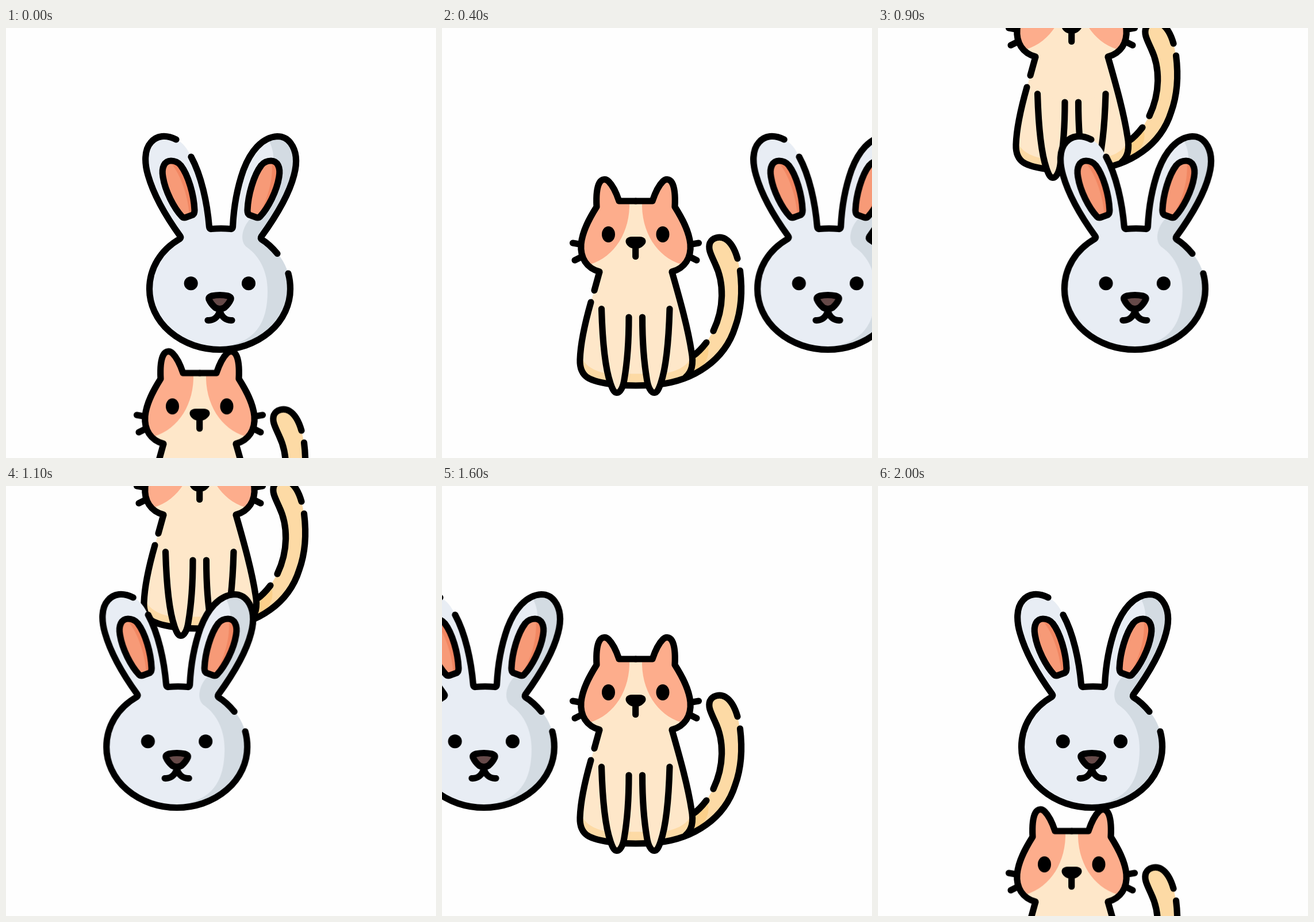
Recreate the animation shown at these times as an HTML page. Size 748x748 px, loop 2100 ms.

```html
<!DOCTYPE html>
<html lang="en">
<head>
<meta charset="utf-8">
<title>Cat and rabbit</title>
<style>
  html, body { margin: 0; width: 100%; height: 100%; overflow: hidden; background: #fefefe; }
  svg { display: block; width: 100%; height: 100%; }

  .line { fill: none; stroke: #000; stroke-width: 11.2; stroke-linecap: round; stroke-linejoin: round; }
  .cream { fill: #fee7c9; }
  .sand { fill: #fddaa5; }
  .amber { fill: #fcd08a; }
  .salmon { fill: #fdad8c; }
  .fur { fill: #e8edf4; }
  .shade { fill: #d3dbe2; }
  .pink { fill: #f79a77; }
  .rose { fill: #f28762; }
  .brown { fill: #664a49; }
  .legs { fill: #fee7c9; }

  /* Both move one tenth of the stage (74.8) every 100 ms and rest for one extra tick. */
  #rabbit { animation: sway 2100ms infinite; }
  #cat { animation: bob 2100ms infinite; }

  @keyframes sway {
    0% { transform: translateX(0); animation-timing-function: steps(5); }
    23.809% { transform: translateX(374px); animation-timing-function: steps(10); }
    71.428% { transform: translateX(-374px); animation-timing-function: steps(5); }
    95.238%, 100% { transform: translateX(0); }
  }
  @keyframes bob {
    0% { transform: translateY(299.2px); animation-timing-function: steps(10); }
    47.619% { transform: translateY(-448.8px); animation-timing-function: steps(10); }
    95.238%, 100% { transform: translateY(299.2px); }
  }
</style>
</head>
<body>
<svg viewBox="0 0 748 748">
  <defs>
    <path id="half-head" d="M337 301H308C304 289 299 276 290 267C285 262 278 262 274 269C270 276 268 292 269 311C257 330 244 353 242 376C240 400 252 418 274 424"/>
    <path id="patch" d="M326 301H308C304 289 299 276 290 267C285 262 278 262 274 269C270 276 268 292 269 311C257 330 244 353 242 376C241 393 247 405 258 411C300 398 328 355 326 301Z"/>
    <path id="leg" d="M277.5 488.500C279 540 284 592 293 618C297 630 300 634.500 304 634.500C310 634.500 315 625 317 612C323 577 325 540 325 503"/>
    <path id="whiskers" d="M227.5 374L239 376M231 404L242 398.5"/>
    <path id="inner-ear" d="M287 231C276 231 270 242 273 259C277 284 292 313 306 328Q309 331 314 329L325 325Q328 323 328 317C327 290 317 256 304 239C299 233 293 231 287 231Z"/>
    <path id="nose" d="M358 466Q372 463 386 466Q392 468 391 472C388 479 384 483 380 486.500Q372 491 364 486.500C360 483 356 479 353 472Q352 468 358 466Z"/>
  </defs>

  <g id="cat">
    <!-- tail -->
    <path class="sand" d="M384 619C440 612 492 578 510 520C522 487 522 450 518.500 422L514 401C510 387 503 373 493 367C483 361 470 365 466 374C462 385 469 396 475 410C491 443 491 487 472 527L460 547C453 556 445 565 437 570L420 600Z"/>
    <path class="amber" d="M436 572L460 548Q470 566 452 590L434 600Z"/>
    <!-- body -->
    <path class="cream" d="M274 424L259 477C249 512 241 546 240 577C239 608 257 615 300 620.500Q337 623.500 374 620.500L424 607C434 600 438 584 434 563C427 517 410 463 399 424Z"/>
    <path class="sand" d="M240 568C247 586 262 597 290 601.500H384C411 597 427 588 435 570C438 586 434 600 424 607L374 620.500Q337 623.500 300 620.500C257 615 239 608 240 577Z"/>
    <g class="line">
      <path d="M274 424L265 456.500M259 477C249 512 241 546 240 577C239 608 257 615 300 620.500Q337 623.500 374 620.500C438 614 492 578 510 520C522 487 522 450 518.500 422"/>
      <path d="M400 424C411 463 427 517 434 563C438 584 434 599 424 607"/>
      <path d="M514 401C510 387 503 373 493 367C483 361 470 365 466 374C462 385 469 396 475 410C491 443 491 487 472 527M460 547C453 556 445 565 437 570"/>
    </g>
    <g class="line legs">
      <use href="#leg"/>
      <use href="#leg" transform="matrix(-1 0 0 1 673.5 0)"/>
    </g>
    <!-- head -->
    <g class="cream">
      <use href="#half-head"/>
      <path d="M308 301H366L405 311L432 376L400 425H274L242 376L269 311Z"/>
      <use href="#half-head" transform="matrix(-1 0 0 1 674 0)"/>
    </g>
    <g class="salmon">
      <use href="#patch"/>
      <use href="#patch" transform="matrix(-1 0 0 1 674 0)"/>
    </g>
    <g class="line">
      <use href="#half-head"/>
      <use href="#half-head" transform="matrix(-1 0 0 1 674 0)"/>
      <use href="#whiskers"/>
      <use href="#whiskers" transform="matrix(-1 0 0 1 674 0)"/>
      <path d="M336.7 380V397.5"/>
    </g>
    <ellipse cx="289.5" cy="359" rx="11.5" ry="14"/>
    <ellipse cx="384" cy="359" rx="11.5" ry="14"/>
    <path d="M330 363H344C352 363 356 368 354 374C350 381 343 384 337 384C330 384 323 381 320 374C318 368 322 363 330 363Z"/>
  </g>

  <g id="rabbit">
    <path class="fur" d="M296 194C278 185 262 187 252 199C240 212 241 236 247 256C257 291 279 329 303 362V366C269 385 249.5 418 249.5 454A122.5 105.5 0 0 0 494.5 454C494.5 430 486 408 472 392C464 381 455 374 443 367C468 330 492 291 501 256C508 230 504 212 495 200C489 192 480 188.5 472 188.5C445 190 425 215 413 247C402 278 396 313 394 349H354C350 304 340 257 322 224C316 211 308 199 296 194Z"/>
    <path class="shade" d="M455 192C463 205 466 218 465 232C455 270 438 310 424 333C411 347 405 372 420 382C442 398 455 425 455 457C455 514 434 548 372 555V559.5A122.5 105.5 0 0 0 494.5 454C494.5 430 486 408 472 392C464 381 455 374 443 367C468 330 492 291 501 256C508 230 504 212 495 200C489 192 480 188.5 472 188.5Z"/>
    <g class="pink">
      <use href="#inner-ear"/>
      <use href="#inner-ear" transform="matrix(-1 0 0 1 748 0)"/>
    </g>
    <g class="rose">
      <path d="M285 233C300 248 317 288 319 327L325 325Q328 323 328 317C327 290 317 256 304 239C299 233 293 231 287 231Z"/>
      <path d="M462 231C466 262 455 300 437 329L442 328C456 313 471 284 475 259C478 242 472 231 462 231Z"/>
    </g>
    <use class="brown" href="#nose"/>
    <g class="line">
      <path d="M296 194C278 185 262 187 252 199C240 212 241 236 247 256C257 291 279 329 303 362Q305 365 302 367C269 386 249.5 418 249.5 454A122.5 105.5 0 0 0 494.5 454C494.5 444 493.5 436 491 427"/>
      <path d="M472 392.5C464 383 455 374 445 368Q442 366 444 363C468 330 492 291 501 256C508 230 504 212 495 200C489 192 480 188.5 472 188.5C445 190 425 215 413 247C402 278 396 313 394.5 346Q394 350 391 349.5Q374 348 357 349.5Q354 350 353.5 346C350 304 340 257 322 224"/>
      <use href="#inner-ear"/>
      <use href="#inner-ear" transform="matrix(-1 0 0 1 748 0)"/>
      <use href="#nose"/>
      <path d="M351 508.5C361 509 369 503 372 492C375 503 383 509 393 508.5"/>
    </g>
    <circle cx="321.7" cy="444.3" r="12"/>
    <circle cx="422" cy="444.3" r="12"/>
  </g>
</svg>
</body>
</html>
```
